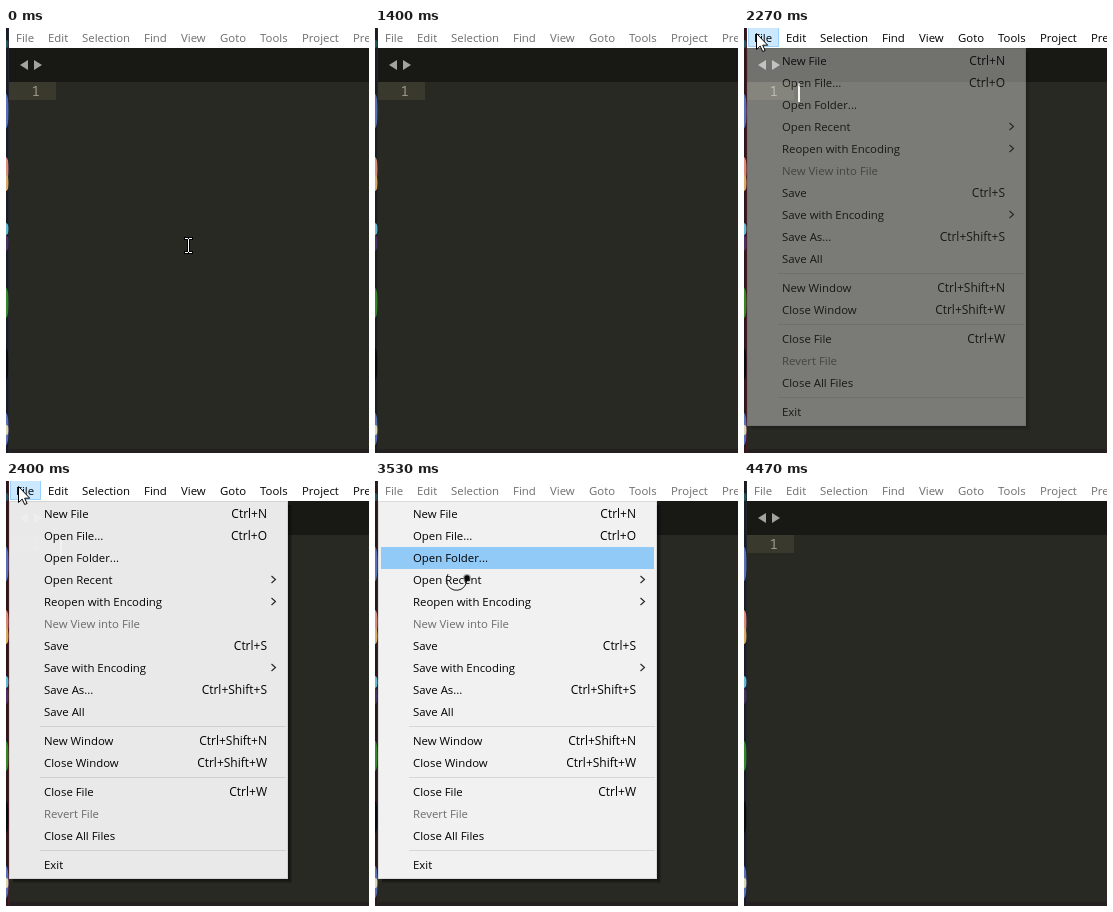
These frames come from a looping animation (363x425 px, 8000 ms). An HTML page with a canvas:

```html
<!DOCTYPE html>
<html lang="en">
<head>
<meta charset="utf-8">
<title>Editor file menu</title>
<style>
html, body { margin: 0; width: 100%; height: 100%; overflow: hidden; background: #282923; }
canvas { display: block; }
</style>
</head>
<body>
<canvas id="stage" width="363" height="425"></canvas>
<script>
const W = 363, H = 425, LOOP = 8000, TICK = 200 / 3;
const UI = '"Open Sans", "Noto Sans", sans-serif';
const stage = document.getElementById('stage').getContext('2d');
const layer = Object.assign(document.createElement('canvas'), { width: W, height: H }).getContext('2d');

const BAR = [['File', 10], ['Edit', 42], ['Selection', 76], ['Find', 138], ['View', 175],
  ['Goto', 214], ['Tools', 254], ['Project', 296], ['Preferences', 347]];

// Each entry: label, shortcut ('>' opens a submenu), disabled. null is a separator.
const MENU = [
  ['New File', 'Ctrl+N'], ['Open File...', 'Ctrl+O'], ['Open Folder...'], ['Open Recent', '>'],
  ['Reopen with Encoding', '>'], ['New View into File', '', true], ['Save', 'Ctrl+S'],
  ['Save with Encoding', '>'], ['Save As...', 'Ctrl+Shift+S'], ['Save All'], null,
  ['New Window', 'Ctrl+Shift+N'], ['Close Window', 'Ctrl+Shift+W'], null,
  ['Close File', 'Ctrl+W'], ['Revert File', '', true], ['Close All Files'], null, ['Exit']
];
const OPEN_FOLDER = 2;

const lerp = (a, b, p) => a + (b - a) * p;
const smooth = p => p * p * (3 - 2 * p);
const easeOut = p => 1 - (1 - p) ** 2;

function rect(c, color, x, y, w, h) {
  c.fillStyle = color;
  c.fillRect(x, y, w, h);
}

function text(c, str, x, y, color, size = 11.4, align = 'left', family = UI) {
  c.font = `${size}px ${family}`;
  c.textAlign = align;
  c.fillStyle = color;
  c.fillText(str, x, y);
}

function polygon(c, points, fill, stroke) {
  c.beginPath();
  points.forEach(([x, y]) => c.lineTo(x, y));
  c.closePath();
  c.fillStyle = fill;
  c.fill();
  if (stroke) {
    c.strokeStyle = stroke;
    c.lineWidth = 1;
    c.stroke();
  }
}

function disc(c, color, x, y, rx, ry = rx) {
  c.beginPath();
  c.ellipse(x, y, rx, ry, 0, 0, 7);
  c.fillStyle = color;
  c.fill();
}

// Sliver of the desktop left of the window
function drawDesktop(c, focused) {
  rect(c, focused ? '#2c171d' : '#191c22', 0, 0, 3, H);
  const icons = [['#24545a', 16, 4], ['#5770b8', 83, 17], ['#d98a78', 141, 12], ['#d8aa66', 155, 8],
    ['#62b8d0', 201, 6], ['#49305f', 215, 8], ['#35862a', 275, 15], ['#08090b', 336, 16],
    ['#5870b7', 401, 16], ['#d9d5b4', 402, 5]];
  for (const [color, y, r] of icons) disc(c, color, 0, y, 2.8, r);
  rect(c, focused ? '#5a202b80' : '#2a2e3a80', 2, 0, 1, H);
}

function drawWindow(c, focused, fileOpen, caret) {
  rect(c, '#282923', 0, 0, W, H);
  drawDesktop(c, focused);
  rect(c, '#fff', 3, 0, W, 20);
  rect(c, '#181914', 3, 20, W, 34);
  rect(c, '#242021', 3, 421, W, 4);
  if (fileOpen) {
    rect(c, '#99d1ff', 4, 0, 31, 19);
    rect(c, '#cce8ff', 5, 0, 29, 18);
  }
  for (const [label, x] of BAR) text(c, label, x, 14, fileOpen ? '#000' : '#6d6d6d');
  polygon(c, [[14, 37], [22, 32], [22, 42]], '#a3a39f');
  polygon(c, [[36, 37], [28, 32], [28, 42]], '#a3a39f');
  rect(c, '#3a392d', 3, 54, 47, 18);
  text(c, '1', 25.5, 68, '#9c9a88', 14, 'left', '"Noto Sans Mono", monospace');
  if (caret) rect(c, '#f8f8f2', 54, 55, 2, 19);
}

function drawItem(c, [label, key, disabled], y, hover) {
  if (hover) rect(c, '#91c9f7', 6, y - 11, 273, 22);
  text(c, label, 38, y + 4, disabled ? '#6d6d6d' : '#000');
  if (key === '>') {
    c.beginPath();
    c.moveTo(265.5, y - 4);
    c.lineTo(269.5, y - 0.5);
    c.lineTo(265.5, y + 3);
    c.strokeStyle = '#222';
    c.lineWidth = 1.1;
    c.stroke();
  } else if (key) {
    text(c, key, 261, y + 4, '#000', 12, 'right');
  }
}

function drawMenu(c, hovered) {
  for (let i = 4; i > 0; i--) rect(c, '#00000028', 7, 24, 275 + i, 374 + i);
  rect(c, '#dadada', 3, 20, 279, 378);
  rect(c, '#f1f1f1', 4, 21, 277, 376);
  let y = 33;
  MENU.forEach((item, i) => {
    if (item) {
      drawItem(c, item, y, i === hovered);
      y += 22;
    } else {
      rect(c, '#d7d7d7', 34, y - 8, 246, 1);
      y += 7;
    }
  });
}

// Draws on a separate layer so that the whole group fades as one.
function fade(alpha, draw) {
  layer.clearRect(0, 0, W, H);
  draw(layer);
  stage.globalAlpha = alpha;
  stage.drawImage(layer.canvas, 0, 0);
  stage.globalAlpha = 1;
}

function drawBeam(c, x, y) {
  x = Math.round(x);
  y = Math.round(y);
  const parts = [[-3, -7, 3, 1], [1, -7, 3, 1], [0, -6, 1, 13], [-3, 7, 3, 1], [1, 7, 3, 1]];
  for (const [dx, dy, w, h] of parts) rect(c, '#000', x + dx - 1, y + dy - 1, w + 2, h + 2);
  for (const [dx, dy, w, h] of parts) rect(c, '#fff', x + dx, y + dy, w, h);
}

function drawArrow(c, x, y) {
  const shape = [[0, 0], [0, 16], [3.7, 12.6], [6.2, 18], [8.6, 17], [6.2, 11.7], [11.2, 11.7]];
  polygon(c, shape.map(([dx, dy]) => [x + dx + 0.5, y + dy + 0.5]), '#fff', '#000');
}

function drawBusy(c) {
  c.beginPath();
  c.arc(81.5, 99, 10.3, -0.15, 3.75);
  c.strokeStyle = '#1c1c1c';
  c.lineWidth = 1;
  c.stroke();
  disc(c, '#00000050', 92, 97, 3.9);
  disc(c, '#080808', 92, 97, 2.7);
}

function pointerAt(n) {
  const along = (kind, from, to, p) => ({ kind, x: lerp(from[0], to[0], p), y: lerp(from[1], to[1], p) });
  if (n < 6) return along(drawBeam, [182, 217], [305, 358], smooth(Math.max(0, (n - 2) / 3)));
  if (n < 16) return null;
  if (n < 21) return along(n < 20 ? drawBeam : drawArrow, [358, 311], [18, 3], easeOut((n - 16) / 4));
  if (n < 27) return null;
  if (n < 28) return { kind: drawArrow, x: 15, y: 0 };
  if (n < 53) return along(drawArrow, [12, 5], [81, 81], smooth(Math.min(1, Math.max(0, (n - 40) / 7))));
  return n < 61 ? { kind: drawBusy } : null;
}

function render(t) {
  // The screen refreshes 15 times a second, on 10 ms marks.
  const n = Math.floor((Math.floor(t / 10) * 10 + 5) / TICK);
  const menuShown = n >= 33 && n < 54;
  const pointer = pointerAt(n);
  drawWindow(stage, menuShown, n >= 33 && n < 53, n >= 33 && n < 67);
  if (menuShown) {
    const hovered = pointer.kind === drawBusy ? OPEN_FOLDER : Math.floor((pointer.y - 22) / 22);
    fade(Math.min(1, 0.13 + (n - 33) * 0.278), c => drawMenu(c, hovered));
  } else if (n >= 54 && n < 59) {
    fade((59 - n) * 0.17, c => drawItem(c, MENU[OPEN_FOLDER], 77, true));
  }
  if (pointer) pointer.kind(stage, pointer.x, pointer.y);
}

function loop() {
  render(performance.now() % LOOP);
  requestAnimationFrame(loop);
}
loop();
</script>
</body>
</html>
```
